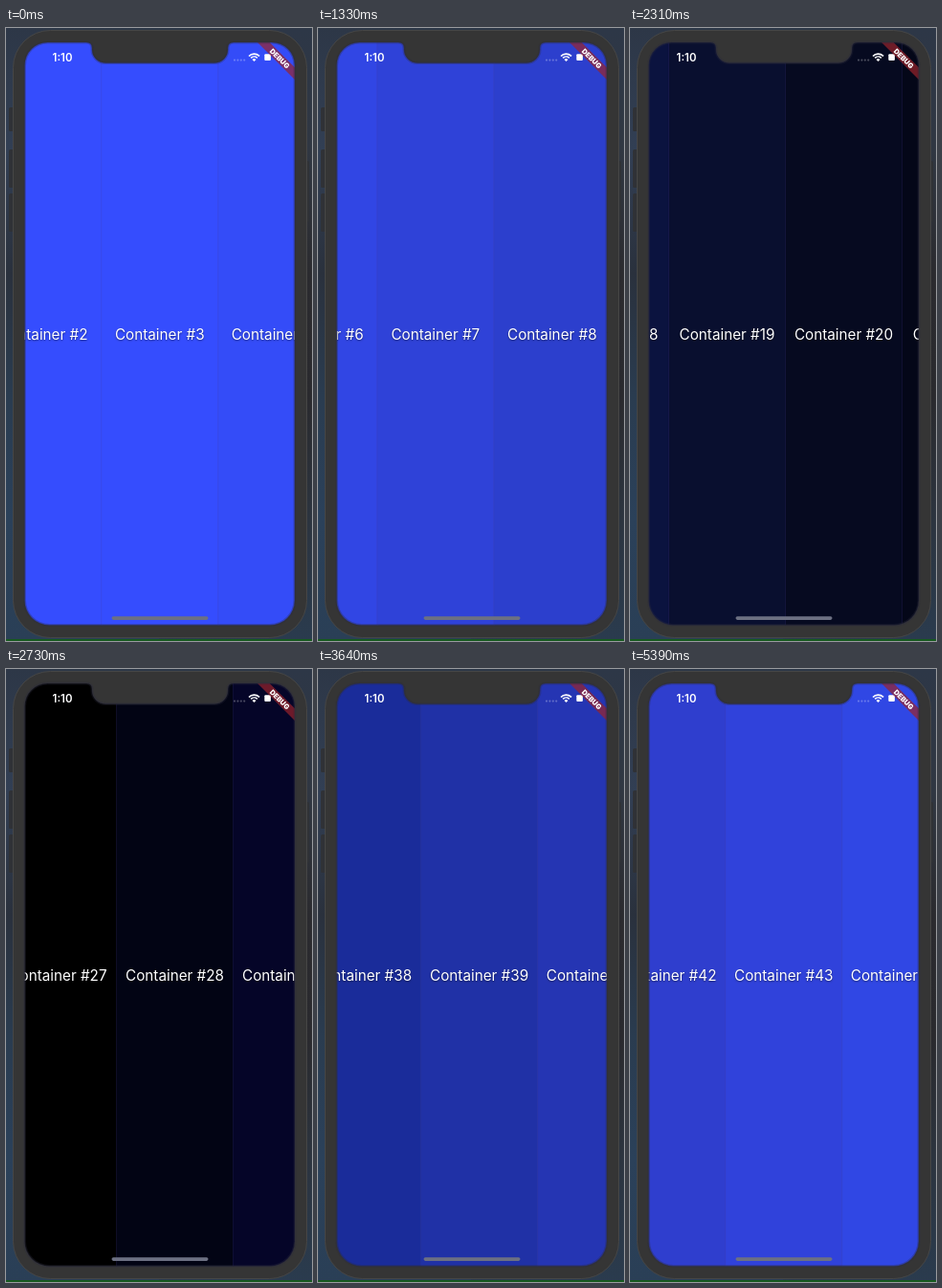
Animation, 320 px wide and 641 px high, one loop 5.46 s. Source, as an HTML page with a canvas:

```html
<!DOCTYPE html>
<html lang="en">
<head>
<meta charset="utf-8">
<title>Container list</title>
<style>
html, body { margin: 0; width: 320px; height: 641px; overflow: hidden; background: #27394e; }
canvas { display: block; width: 320px; height: 641px; }
</style>
</head>
<body>
<canvas id="stage"></canvas>
<script>
const W = 320, H = 641, LOOP = 5460, STEP = 70;
const ITEM = 122, MID = 160.75;
const FONT = 'Inter, "Liberation Sans", sans-serif';
const FIRST = 3, LAST = 43;
const FRAME = '#353535';

const canvas = document.getElementById('stage');
const dpr = window.devicePixelRatio || 1;
canvas.width = W * dpr;
canvas.height = H * dpr;
const ctx = canvas.getContext('2d');
ctx.scale(dpr, dpr);

// Cubic ease-in-out as a Bezier (0.645, 0.045, 0.355, 1)
const bez = (a, b, s) => 3 * (1 - s) * (1 - s) * s * a + 3 * (1 - s) * s * s * b + s * s * s;
const easeX = s => bez(0.645, 0.355, s);
const easeY = s => bez(0.045, 1, s);

function solve(f, v) {
  let lo = 0, hi = 1;
  for (let i = 0; i < 40; i++) {
    const m = (lo + hi) / 2;
    if (f(m) < v) lo = m; else hi = m;
  }
  return (lo + hi) / 2;
}

function lerpStops(stops, v) {
  if (v <= stops[0][0]) return stops[0].slice(1);
  for (let i = 1; i < stops.length; i++) {
    const a = stops[i - 1], b = stops[i];
    if (v <= b[0]) {
      const k = (v - a[0]) / (b[0] - a[0]);
      return a.slice(1).map((c, j) => c + (b[j + 1] - c) * k);
    }
  }
  return stops[stops.length - 1].slice(1);
}

// Time in ms against the item at the centre, turned into eased progress
const pace = [[0, 3], [770, 4.545], [1820, 11.883], [2730, 27.871],
  [3220, 34.945], [4340, 42.111], [5140, 43]]
  .map(([t, n]) => [t, easeX(solve(easeY, (n - FIRST) / (LAST - FIRST)))]);

const position = t =>
  FIRST + (LAST - FIRST) * easeY(solve(easeX, lerpStops(pace, t)[0]));

// Item number, red, green, blue
const shades = [
  [3, 53, 77, 254], [4, 52, 76, 248], [5, 51, 73, 238], [6, 49, 70, 228],
  [11, 37, 52, 170], [12, 32, 48, 154], [13, 26, 43, 136], [17, 14, 24, 78],
  [20, 6, 10, 32], [23, 1, 2, 8], [27, 0, 0, 0], [28, 2, 4, 20],
  [29, 5, 5, 40], [34, 8, 18, 97], [35, 23, 30, 112], [36, 15, 36, 128],
  [41, 43, 57, 192], [42, 47, 62, 206], [43, 48, 66, 219], [44, 48, 71, 228]
];
const shade = n => 'rgb(' + lerpStops(shades, n).map(Math.round).join(',') + ')';

function fillRound(x, y, w, h, r, color) {
  ctx.fillStyle = color;
  ctx.beginPath();
  ctx.roundRect(x, y, w, h, r);
  ctx.fill();
}

function vertical(...colors) {
  const g = ctx.createLinearGradient(0, 0, 0, H);
  colors.forEach((c, i) => g.addColorStop(i / (colors.length - 1), c));
  return g;
}

function drawBackdrop() {
  ctx.fillStyle = vertical('#2d3747', '#323f54', '#2a313d', '#2a3c50', '#2b415a', '#2a3f56');
  ctx.fillRect(0, 0, 160, H);
  ctx.fillStyle = vertical('#2d3747', '#303742', '#2b2b2f', '#2a2a2e', '#2c343f', '#2a3b4e');
  ctx.fillRect(160, 0, 160, H);
  ctx.fillStyle = '#16591f';
  ctx.fillRect(0, 639, W, 2);
}

function drawBody() {
  for (const [y, h] of [[83, 25], [127, 40], [173, 40]]) fillRound(3, y, 7, h, 1.5, '#303236');
  fillRound(312, 139, 5, 64, 1.5, '#303236');
  fillRound(7.5, 2.5, 307, 635, 39, FRAME);
  ctx.strokeStyle = '#464646';
  ctx.lineWidth = 1;
  ctx.stroke();
}

function drawItems(u) {
  const from = Math.floor(u) - 2;
  for (let n = from; n < from + 6; n++) {
    const cx = MID + (n - u) * ITEM, left = cx - ITEM / 2;
    ctx.fillStyle = shade(n);
    ctx.fillRect(left, 14, ITEM + 0.6, 612);
    ctx.fillStyle = 'rgba(75,65,150,0.2)';
    ctx.fillRect(left - 0.5, 14, 1, 612);
  }
  ctx.save();
  ctx.font = '400 15.25px ' + FONT;
  ctx.textAlign = 'center';
  ctx.fillStyle = '#fff';
  ctx.shadowColor = 'rgba(0,0,0,0.5)';
  ctx.shadowBlur = 2 * dpr;
  ctx.shadowOffsetY = dpr;
  for (let n = from; n < from + 6; n++) ctx.fillText('Container #' + n, MID + (n - u) * ITEM, 325.8);
  ctx.restore();
}

// The screen is the rounded display less the notch
function screenPath() {
  ctx.beginPath();
  ctx.moveTo(45, 15);
  ctx.lineTo(84, 15);
  ctx.quadraticCurveTo(90, 15, 90, 21);
  ctx.arcTo(90, 36.5, 106, 36.5, 14);
  ctx.arcTo(232, 36.5, 232, 21, 14);
  ctx.lineTo(232, 21);
  ctx.quadraticCurveTo(232, 15, 238, 15);
  ctx.arcTo(302, 15, 302, 60, 24);
  ctx.arcTo(302, 624.5, 200, 624.5, 26);
  ctx.arcTo(19.5, 624.5, 19.5, 500, 26);
  ctx.arcTo(19.5, 15, 45, 15, 24);
  ctx.closePath();
}

function drawStatus() {
  ctx.fillStyle = '#fff';
  ctx.font = '600 11.4px ' + FONT;
  ctx.textAlign = 'center';
  ctx.fillText('1:10', 59, 34.8);

  ctx.fillStyle = 'rgba(255,255,255,0.27)';
  for (let i = 0; i < 4; i++) {
    ctx.beginPath();
    ctx.arc(239 + i * 3.4, 33.6, 1.1, 0, 7);
    ctx.fill();
  }

  ctx.strokeStyle = '#fff';
  ctx.lineWidth = 1.7;
  for (const r of [4.6, 7.5]) {
    ctx.beginPath();
    ctx.arc(259.5, 34.6, r, -Math.PI * 0.76, -Math.PI * 0.24);
    ctx.stroke();
  }
  ctx.fillStyle = '#fff';
  ctx.beginPath();
  ctx.moveTo(259.5, 35);
  ctx.arc(259.5, 35, 2.8, -Math.PI * 0.76, -Math.PI * 0.24);
  ctx.fill();
  fillRound(270.3, 27.3, 6.6, 6.8, 1, '#fff');
}

function drawBanner() {
  ctx.save();
  ctx.translate(303, 15);
  ctx.rotate(Math.PI / 4);
  ctx.fillStyle = 'rgba(155,36,44,0.7)';
  ctx.fillRect(-40, 19.3, 80, 9);
  ctx.fillStyle = '#fff';
  ctx.font = '900 7.4px ' + FONT;
  ctx.textAlign = 'center';
  ctx.fillText('DEBUG', 0, 26.5);
  ctx.restore();
}

function drawScreen(t) {
  ctx.save();
  screenPath();
  ctx.clip();
  drawItems(position(t));
  drawStatus();
  drawBanner();
  fillRound(110.5, 615.3, 101, 3.6, 1.8, '#6c7082');
  ctx.restore();

  // Soft rim where the display meets the frame
  screenPath();
  ctx.lineWidth = 3;
  ctx.strokeStyle = 'rgba(45,45,60,0.3)';
  ctx.stroke();
  ctx.lineWidth = 1;
  ctx.strokeStyle = 'rgba(45,45,60,0.4)';
  ctx.stroke();
}

function draw(t) {
  drawBackdrop();
  drawBody();
  drawScreen(t);
}

const start = performance.now();
function tick() {
  const t = (performance.now() - start) % LOOP;
  draw(Math.floor(t / STEP) * STEP);
  requestAnimationFrame(tick);
}
tick();
</script>
</body>
</html>
```
